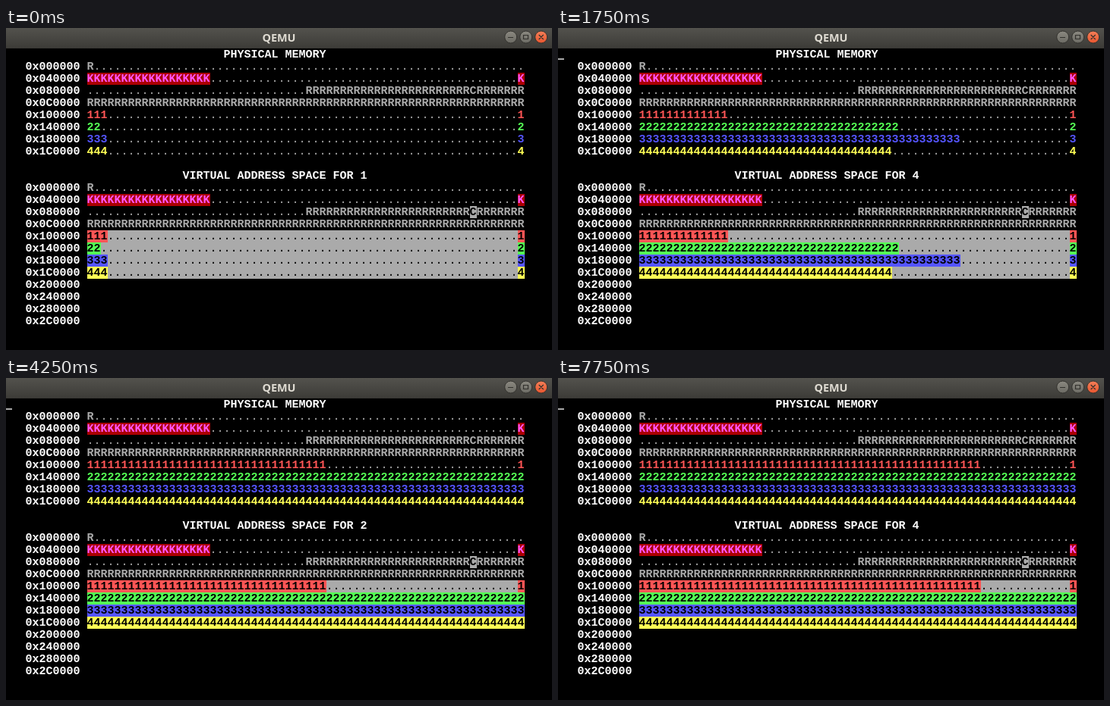
An HTML page for the animation above (8 s loop, 719 px wide and 425 px high).

```html
<!DOCTYPE html>
<html lang="en">
<head>
<meta charset="utf-8">
<title>QEMU</title>
<style>
  html, body { margin: 0; width: 100%; height: 100%; overflow: hidden; background: #000; }
  #stage { position: relative; width: 719px; height: 425px; overflow: hidden; background: #000; }
  #bar {
    position: absolute; left: 0; top: 0; width: 719px; height: 27px;
    background: linear-gradient(#53524d, #3d3c38 96%, #33322e);
    color: #dfdbd2; font: bold 14.4px/25px "Open Sans", sans-serif; text-align: center;
  }
  #bar svg { position: absolute; left: 0; top: 0; }
  #screen {
    position: absolute; left: -1px; top: 27px; width: 720px; height: 400px;
    font: bold 15px/18px "Liberation Mono", monospace; color: #fff;
  }
  .row { position: absolute; display: flex; height: 16px; white-space: pre; }
  /* Glyphs sit slightly left in their 9px cells; the padding keeps the grid. */
  .row span { flex: none; height: 16px; text-indent: -0.6px; padding-right: 0.6px; letter-spacing: -0.0015px; }
  .row .dots { font-weight: normal; }
  #cursor { position: absolute; left: 0; top: 13px; width: 9px; height: 2px; background: #aaa; }
</style>
</head>
<body>
<div id="stage">
  <div id="bar">QEMU
    <svg width="719" height="27" fill="none">
      <defs>
        <linearGradient id="grey" x2="0" y2="1"><stop stop-color="#8b8981"/><stop offset="1" stop-color="#6b6a63"/></linearGradient>
        <linearGradient id="red" x2="0" y2="1"><stop stop-color="#f37f58"/><stop offset="1" stop-color="#e8562f"/></linearGradient>
      </defs>
      <g stroke="#32312d">
        <circle cx="664.7" cy="12" r="8" fill="url(#grey)"/>
        <circle cx="684.7" cy="12" r="8" fill="url(#grey)"/>
        <circle cx="704.7" cy="12" r="8" fill="url(#red)"/>
        <path d="M661 12.5h7M681.5 9.5h6v5h-6zM701.7 9l6 6M707.7 9l-6 6" stroke-width="1.2"/>
      </g>
    </svg>
  </div>
  <div id="screen"><div id="cursor"></div></div>
</div>
<script>
const STEP = 250, STEPS = 32, COLS = 64;
const GREY = '#aaa', BLACK = '#000';
const COLORS = ['#ff5555', '#55ff55', '#5555ff', '#ffff55'];

// Pages in use per process, as [step, count] points.
const USAGE = [
  [[0, 3], [3, 9], [7, 13], [9, 20], [14, 29], [20, 41], [21, 41], [25, 46], [30, 50]],
  [[0, 2], [3, 21], [7, 38], [9, 48], [14, 60], [15, 63]],
  [[0, 3], [3, 23], [7, 47], [9, 63]],
  [[0, 3], [3, 19], [7, 37], [9, 55], [10, 62], [11, 63]]
];

const screen = document.getElementById('screen');
const cursor = document.getElementById('cursor');

function addRow(line, col, html = '') {
  const row = document.createElement('div');
  row.className = 'row';
  row.style.left = col * 9 + 'px';
  row.style.top = line * 16 + 'px';
  row.innerHTML = html;
  screen.append(row);
  return row;
}

function run(ch, count, color, back = 'transparent') {
  if (!count) return '';
  const cls = ch === '.' ? ' class="dots"' : '';
  return `<span${cls} style="color:${color};background:${back}">${ch.repeat(count)}</span>`;
}

const dots = n => run('.', n, GREY);
const reserved = n => run('R', n, GREY);
const kernel = n => run('K', n, '#ff55ff', '#aa0000');

function addMap(line, addresses, user) {
  for (let i = 0; i < addresses; i++) {
    const hex = (i * 0x40000).toString(16).toUpperCase().padStart(6, '0');
    addRow(line + i, 3, `<span>0x${hex}</span>`);
  }
  const consolePage = user ? run('C', 1, BLACK, GREY) : run('C', 1, GREY);
  addRow(line, 12, reserved(1) + dots(63));
  addRow(line + 1, 12, kernel(18) + dots(45) + kernel(1));
  addRow(line + 2, 12, dots(32) + reserved(24) + consolePage + reserved(7));
  addRow(line + 3, 12, reserved(COLS));
  return COLORS.map((_, i) => addRow(line + 4 + i, 12));
}

function countAt(points, step) {
  const next = points.findIndex(p => p[0] > step);
  if (next < 0) return points[points.length - 1][1];
  const [s0, n0] = points[next - 1], [s1, n1] = points[next];
  return Math.round(n0 + (n1 - n0) * (step - s0) / (s1 - s0));
}

function processRow(i, count, user) {
  const id = String(i + 1);
  const pages = n => user ? run(id, n, BLACK, COLORS[i]) : run(id, n, COLORS[i]);
  const free = user ? run('.', 63 - count, BLACK, GREY) : dots(63 - count);
  return pages(count) + free + pages(1);
}

addRow(0, 32, '<span>PHYSICAL MEMORY</span>');
const physical = addMap(1, 8, false);
const heading = addRow(10, 26);
const virtual = addMap(11, 12, true);

let shown = -1;
function draw() {
  const step = Math.floor(performance.now() / STEP) % STEPS;
  if (step !== shown) {
    shown = step;
    USAGE.forEach((points, i) => {
      const count = countAt(points, step);
      physical[i].innerHTML = processRow(i, count, false);
      virtual[i].innerHTML = processRow(i, count, true);
    });
    heading.innerHTML = `<span>VIRTUAL ADDRESS SPACE FOR ${step % 4 + 1}</span>`;
    cursor.style.visibility = step % 2 ? 'visible' : 'hidden';
  }
  requestAnimationFrame(draw);
}
draw();
</script>
</body>
</html>
```
